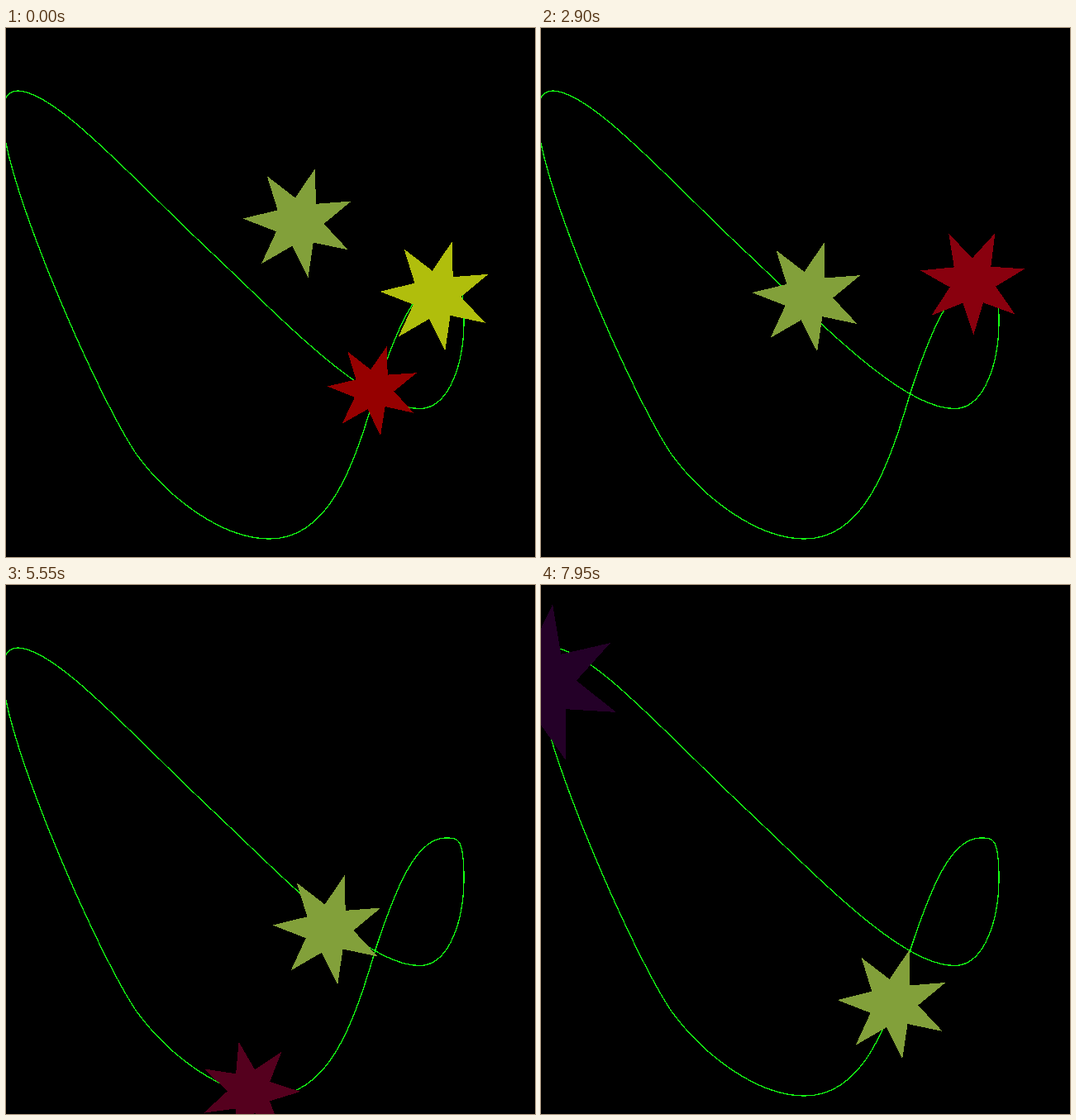
Recreate the animation shown at these times as an HTML page. Size 640 by 640 pixels, loop 8000 ms.

```html
<!DOCTYPE html>
<html lang="en">
<head>
<meta charset="utf-8">
<title>Star on a loop</title>
<style>
  html, body { margin: 0; height: 100%; overflow: hidden; background: #000; }
  svg { display: block; width: 100vw; height: 100vh; }
</style>
</head>
<body>
<svg viewBox="0 0 640 640" shape-rendering="crispEdges">
  <path id="track" fill="none" stroke="#14ff14" stroke-width="1.3" d="
    M500 460.5 C537 460.5 554 404 554 355 S547 306 532 306
    C497 306 473 362 447 441 C420 533 390 618 319 618
    C262 618 198 570 158 516 C108 441 -2 187 -4 110
    C-6 88 2 76 14 76 C60 76 156 185 250 273
    C330 348 435 460.5 500 460.5 Z"/>
  <polygon id="olive" fill="#82a03a"/>
  <polygon id="yellow" fill="#b0be0c"/>
  <polygon id="red"/>
</svg>
<script>
const LOOP = 8000, STEP = 50, TIPS = 7, INNER = 0.44;
const SMALL = 68, TILT = -22;
const [track, olive, yellow, red] =
  ['track', 'olive', 'yellow', 'red'].map(id => document.getElementById(id));
const trackLength = track.getTotalLength();

// Smooth curve through one value per key time, in seconds
const keyTimes = [0, 0.8, 2, 3.75, 5.55, 7, 7.95];
function timed(...values) {
  const last = values.length - 1;
  const rise = i => (values[i + 1] - values[i]) / (keyTimes[i + 1] - keyTimes[i]);
  const slope = i => {
    if (i === 0) return rise(0);
    if (i === last) return rise(last - 1);
    const before = keyTimes[i] - keyTimes[i - 1], after = keyTimes[i + 1] - keyTimes[i];
    return (rise(i - 1) * after + rise(i) * before) / (before + after);
  };
  return t => {
    let i = 0;
    while (i < last - 1 && t >= keyTimes[i + 1]) i++;
    const h = keyTimes[i + 1] - keyTimes[i], f = (t - keyTimes[i]) / h, g = 1 - f;
    return values[i] * g * g * (1 + 2 * f) + values[i + 1] * f * f * (3 - 2 * f)
      + h * f * g * (slope(i) * g - slope(i + 1) * f);
  };
}

const oliveX = timed(354.7, 338.3, 322.4, 334.4, 390.5, 417.5, 426.4);
const oliveY = timed(235, 259.5, 299.5, 349, 416, 476, 506.5);
const distance = timed(-63, -3, 107, 316, 621, 1077, 1218);
const shade = timed(0, 0.26, 0.3, 0, 0.57, 0.59, 1);

// Pulses, then stays swollen
const redRadius = t => 56 + 42 * Math.abs(Math.sin(Math.PI * Math.min(t, 7) / 2.72));
const redAngle = t => 30 + 180 * t;

function redColor(t) {
  const s = Math.min(1, Math.max(0, shade(t)));
  return `rgb(${Math.round(150 - 114 * s)},0,${Math.round(40 * Math.sqrt(s))})`;
}

function placeStar(star, x, y, radius, degrees) {
  const points = Array.from({ length: TIPS * 2 }, (_, i) => {
    const a = degrees * Math.PI / 180 + i * Math.PI / TIPS;
    const r = i % 2 ? radius * INNER : radius;
    return `${(x + r * Math.cos(a)).toFixed(2)},${(y + r * Math.sin(a)).toFixed(2)}`;
  });
  star.setAttribute('points', points.join(' '));
}

function draw(t) {
  placeStar(olive, oliveX(t), oliveY(t), SMALL, TILT);
  placeStar(yellow, 520.5 + 146 * t, 323.3 + 22.5 * t, SMALL, TILT);
  const spot = track.getPointAtLength((distance(t) + trackLength) % trackLength);
  placeStar(red, spot.x + 3.5, spot.y - 2, redRadius(t), redAngle(t));
  red.setAttribute('fill', redColor(t));
}

const start = performance.now();
function tick() {
  const ms = (performance.now() - start) % LOOP;
  draw(Math.floor(ms / STEP) * STEP / 1000);
  requestAnimationFrame(tick);
}
tick();
</script>
</body>
</html>
```
